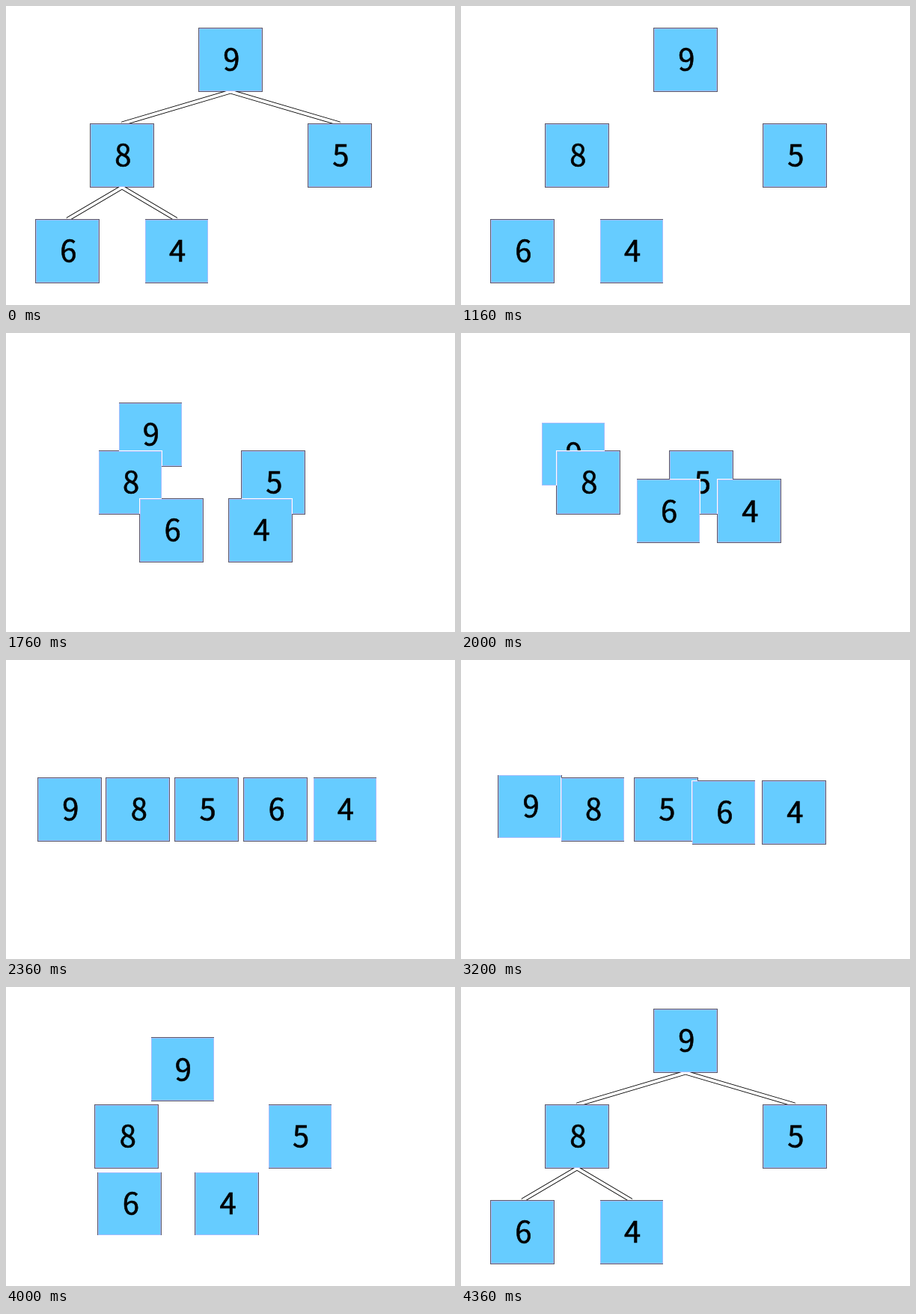
Recreate the animation shown at these times as an HTML page with a canvas. Size 600 by 400 pixels, loop 5.52 s.

```html
<!DOCTYPE html>
<html lang="en">
<head>
<meta charset="utf-8">
<title>Heap: tree and array</title>
<style>
  html, body { margin: 0; width: 100%; height: 100%; overflow: hidden; background: #fff; }
  canvas { display: block; width: 600px; height: 400px; }
</style>
</head>
<body>
<canvas id="stage" width="600" height="400"></canvas>
<script>
const ctx = document.getElementById('stage').getContext('2d');
const LOOP = 5520, STEP = 40, MOVE = 1200;
const OPEN = 1160;   // tree starts to flatten
const CLOSE = 3160;  // array starts to fold back
const SIZE = 86, INNER = SIZE - 2;
const FONT = '40px "Noto Sans CJK JP", "Noto Sans CJK SC", "Noto Sans CJK", "Open Sans", sans-serif';

// tree and array hold the top left corner of each box
const nodes = [
  { label: '9', tree: [257, 29], array: [42, 157] },
  { label: '8', tree: [112, 157], array: [133.45, 157] },
  { label: '5', tree: [403, 157], array: [225.1, 157] },
  { label: '6', tree: [39, 285], array: [317.2, 157] },
  { label: '4', tree: [184.6, 285], array: [409.55, 157] }
];

const mix = (a, b, p) => a + (b - a) * p;
const clamp = v => Math.min(1, Math.max(0, v));

// Whole-pixel start of the fill; the outline fades out past half a pixel
function snap(v) {
  const dark = v - Math.floor(v) < 0.49;
  return { start: Math.floor(v) + (dark ? 1 : 2), dark };
}

function fill(color, x, y, w, h) {
  ctx.fillStyle = color;
  ctx.fillRect(x, y, w, h);
}

// The outline is dark on the background and white over the boxes below
function drawBox(x, y, label, below) {
  const h = snap(x), v = snap(y);
  const dx = h.dark ? 1 : 0, dy = v.dark ? 1 : 0;
  fill('#5c5c68', h.start - dx, v.start - dy, INNER + 2 * dx, INNER + 2 * dy);

  ctx.save();
  ctx.beginPath();
  for (const b of below) ctx.rect(b.x, b.y, INNER, INNER);
  ctx.clip();
  fill('#fff', h.start - 1, v.start - 1, SIZE, SIZE);
  ctx.restore();

  fill('#a6bcfc', h.start, v.start, INNER, INNER);
  fill('#66ccff', h.start + 1, v.start + 1, INNER - 2, INNER - 2);

  const tx = x + SIZE / 2 + 1.4, ty = y + SIZE / 2 + 14.2;
  ctx.fillStyle = ctx.strokeStyle = '#000';
  ctx.lineWidth = 0.6;
  ctx.fillText(label, tx, ty);
  ctx.strokeText(label, tx, ty);
  below.push({ x: h.start, y: v.start });
}

// Hollow double-line branches from one box down to its two children
function drawBranches(parent, children) {
  const px = parent.tree[0] + SIZE / 2, py = parent.tree[1] + SIZE;
  const cy = children[0].tree[1];
  ctx.save();
  ctx.beginPath();
  ctx.rect(0, py - 1, 600, cy - py + 1);
  ctx.clip();
  for (const [color, width] of [['#000', 5.8], ['#fff', 4]]) {
    ctx.strokeStyle = color;
    ctx.lineWidth = width;
    ctx.beginPath();
    for (const child of children) {
      ctx.moveTo(px, py - 0.5);
      ctx.lineTo(child.tree[0] + SIZE / 2, cy + 0.5);
    }
    ctx.stroke();
  }
  ctx.restore();
}

function draw(t) {
  const p = clamp((t - OPEN) / MOVE) - clamp((t - CLOSE) / MOVE);
  const below = [];
  fill('#fff', 0, 0, 600, 400);
  ctx.font = FONT;
  ctx.textAlign = 'center';
  for (const { tree, array, label } of nodes) {
    drawBox(mix(tree[0], array[0], p), mix(tree[1], array[1], p), label, below);
  }
  if (t < OPEN || t >= CLOSE + MOVE) {
    drawBranches(nodes[0], [nodes[1], nodes[2]]);
    drawBranches(nodes[1], [nodes[3], nodes[4]]);
  }
}

const begin = performance.now();
function tick() {
  const t = (performance.now() - begin) % LOOP;
  draw(Math.floor(t / STEP) * STEP);
  requestAnimationFrame(tick);
}
tick();
</script>
</body>
</html>
```
